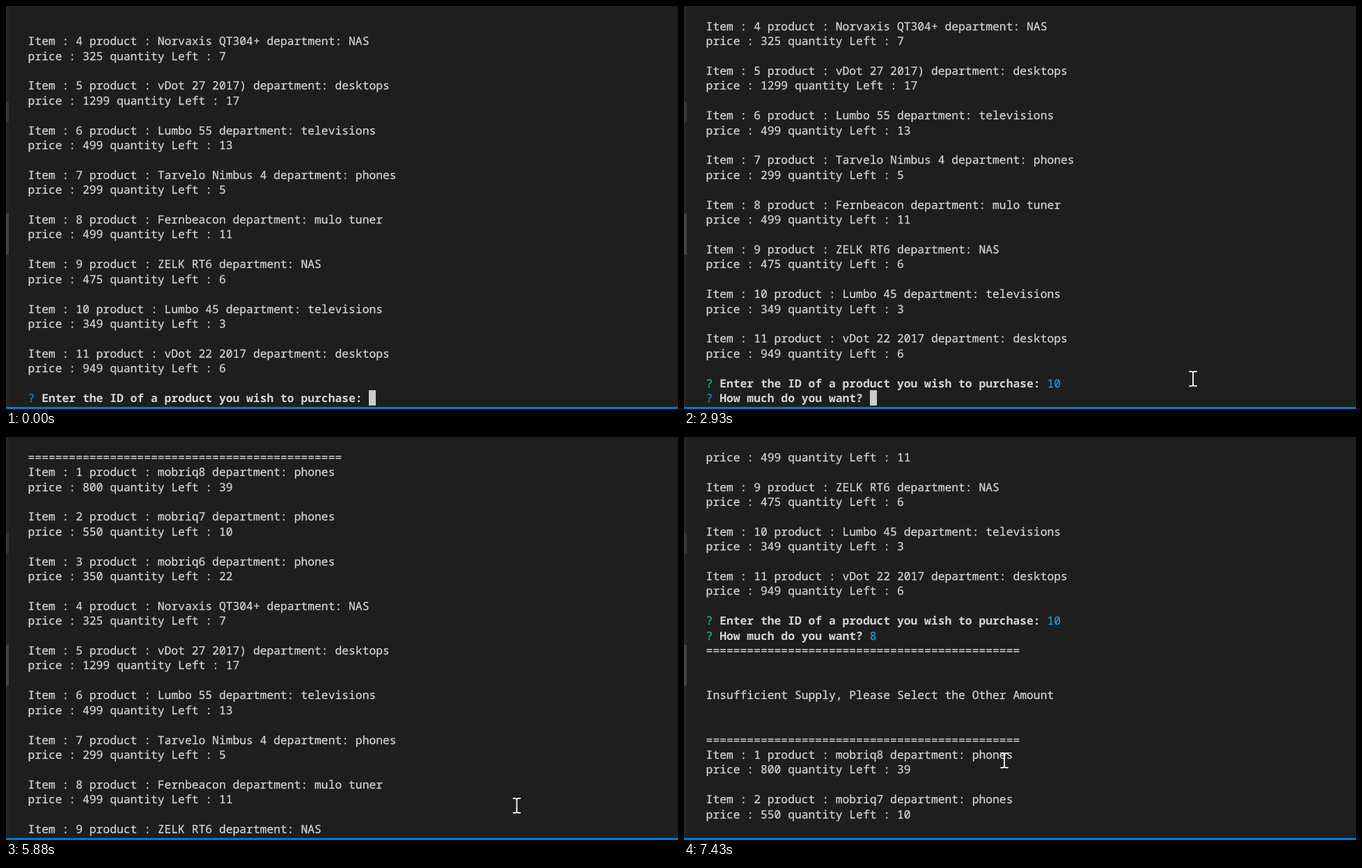
These frames come from a looping animation (965 by 580 pixels, 8 s). An HTML page:

```html
<!DOCTYPE html>
<html lang="en">
<head>
<meta charset="utf-8">
<title>Store terminal</title>
<style>
  html, body { margin: 0; width: 100%; height: 100%; overflow: hidden; background: #1e1e1e; }
  #stage { position: relative; width: 965px; height: 580px; overflow: hidden; background: #1e1e1e; }
  #stage > * { position: absolute; }
  .edge { left: 0; top: 0; width: 4px; height: 577px; background: #252526; }
  .mark { left: 0; width: 4px; background: #37373d; }
  .bar { left: 0; bottom: 0; width: 965px; height: 3px; background: #007acc; }
  #rows {
    left: 31.6px; top: 18.8px; color: #d4d4d4; white-space: pre;
    font: 16.333px/21.42px "Noto Sans Mono", "DejaVu Sans Mono", monospace;
    font-variant-ligatures: none; text-rendering: geometricPrecision;
    -webkit-text-stroke: .25px;
  }
  #rows div { height: 21.42px; }
  #rows b { -webkit-text-stroke: 0; }
  #rows i { position: absolute; width: 9.8px; height: 22px; margin-top: -1px; background: #ccc; }
  .open { color: #2b8bc8; }
  .done { color: #1dc07c; }
  .answer { color: #229fd8; }
  #mouse { left: -7px; top: -11px; width: 13px; height: 23px; fill: none; stroke: #fff; stroke-width: 1.8; }
</style>
</head>
<body>
<div id="stage">
  <div class="edge"></div>
  <div class="mark" style="top:138px;height:29px"></div>
  <div class="mark" style="top:299px;height:59px;background:#424242"></div>
  <div id="rows"></div>
  <div class="bar"></div>
  <svg id="mouse" viewBox="0 0 13 23">
    <path d="M.8 1.2h4.2l1.5 1 1.5-1h4.2M6.5 2v19M.8 21.8h4.2l1.5-1 1.5 1h4.2"/>
  </svg>
</div>
<script>
const LOOP = 8000, ROWS = 26;
const ID_SENT = 2930, AMOUNT_SENT = 4940;

// id, product, department, price, quantity
const stock = [
  [1, 'mobriq8', 'phones', 800, 39],
  [2, 'mobriq7', 'phones', 550, 10],
  [3, 'mobriq6', 'phones', 350, 22],
  [4, 'Norvaxis QT304+', 'NAS', 325, 7],
  [5, 'vDot 27 2017)', 'desktops', 1299, 17],
  [6, 'Lumbo 55', 'televisions', 499, 13],
  [7, 'Tarvelo Nimbus 4', 'phones', 299, 5],
  [8, 'Fernbeacon', 'mulo tuner', 499, 11],
  [9, 'ZELK RT6', 'NAS', 475, 6],
  [10, 'Lumbo 45', 'televisions', 349, 3],
  [11, 'vDot 22 2017', 'desktops', 949, 6],
];

// Each track lists [start time, value]; values hold until the next start.
const scroll = [[0, 0], [ID_SENT, 1], [AMOUNT_SENT, 42], [5880, 33], [6030, 23], [6580, 14]];
const typedId = [[0, ''], [1840, '1'], [2150, '10']];
const typedAmount = [[0, ''], [4340, '8']];
const mousePath = [
  [0, null], [290, [765.5, 551]], [370, [727.5, 529]], [450, [738.5, 539]],
  [600, [719.5, 528]], [680, [731.5, 535]], [910, [731.5, 536]], [5800, [734, 530]],
  [7130, [710, 526]], [7205, [625, 508]], [7280, [540, 486]], [7355, [482, 470]], [7430, [460.5, 465]],
];
const at = (track, t) => track.findLast(([start]) => start <= t)[1];

const list = items => items.flatMap(([id, name, dept, price, left]) => [
  `Item : ${id} product : ${name} department: ${dept}`,
  `price : ${price} quantity Left : ${left}`,
  '',
]);

const ask = (question, text, open) =>
  `<span class="${open ? 'open' : 'done'}">?</span> <b>${question}</b> ` +
  (open ? `${text}<i></i>` : `<span class="answer">${text}</span>`);

const askId = (text, open) => ask('Enter the ID of a product you wish to purchase:', text, open);
const rule = '='.repeat(46);
const older = ['', ...list(stock.slice(3))];
const newer = [
  rule, '', '', 'Insufficient Supply, Please Select the Other Amount', '', '', rule,
  ...list(stock), askId('', true),
];

const rows = document.getElementById('rows');
const mouse = document.getElementById('mouse');
let shown = '';

function draw(t) {
  const lines = [
    ...older,
    askId(at(typedId, t), t < ID_SENT),
    ask('How much do you want?', at(typedAmount, t), t < AMOUNT_SENT),
    ...newer,
  ];
  const top = at(scroll, t);
  const html = lines.slice(top, top + ROWS).map(line => `<div>${line}</div>`).join('');
  if (html !== shown) rows.innerHTML = shown = html;

  const spot = at(mousePath, t);
  mouse.style.visibility = spot ? 'visible' : 'hidden';
  if (spot) mouse.style.transform = `translate(${spot[0]}px, ${spot[1]}px)`;
}

const begin = performance.now();
function tick() {
  draw((performance.now() - begin) % LOOP);
  requestAnimationFrame(tick);
}
tick();
</script>
</body>
</html>
```
